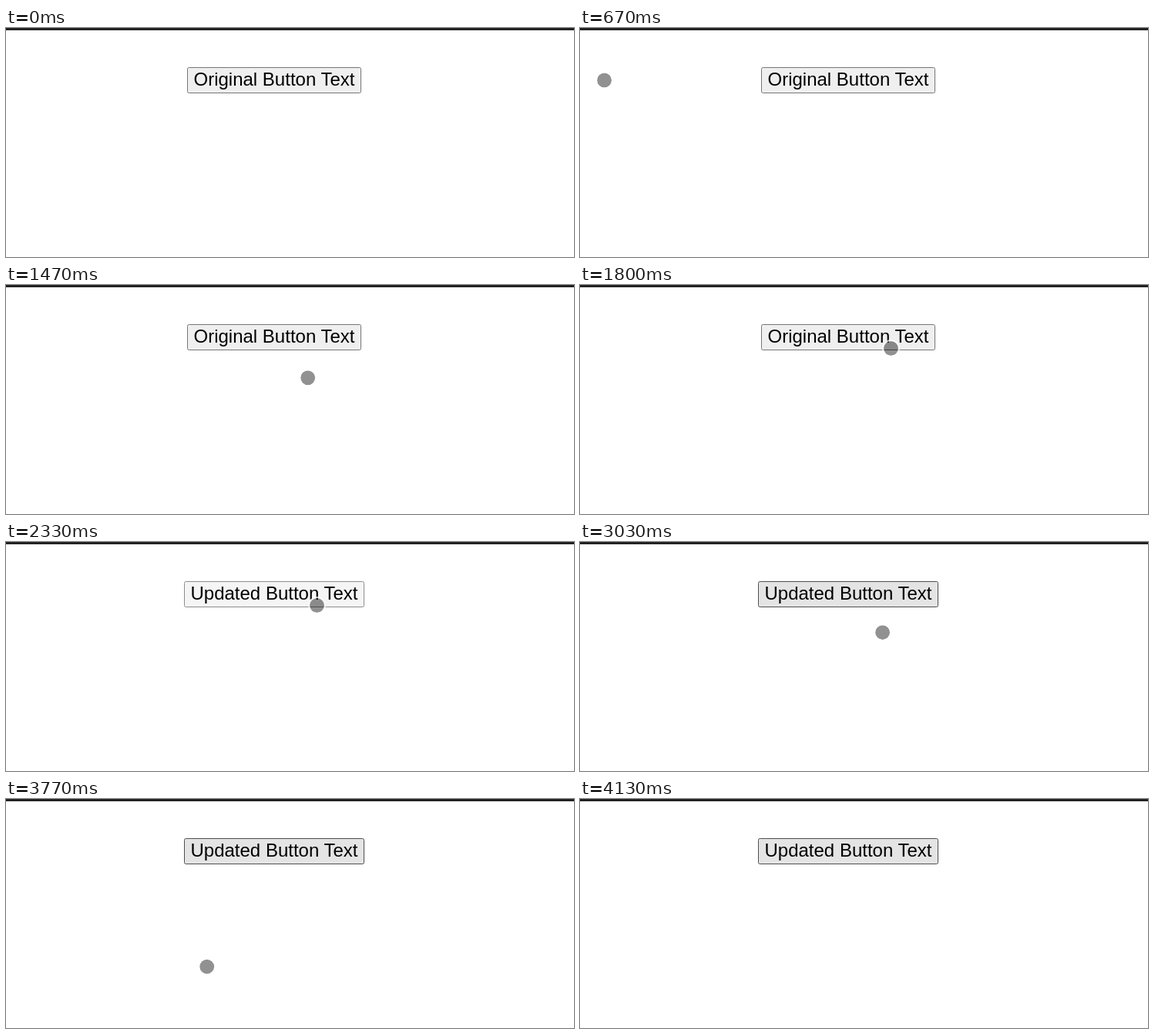
Recreate the animation shown at these times as an HTML page. Size 737 by 298 pixels, loop 6710 ms.

```html
<!DOCTYPE html>
<html lang="en">
<head>
<meta charset="utf-8">
<title>Button press</title>
<style>
  html, body { margin: 0; width: 100%; height: 100%; overflow: hidden; background: #fff; }
  svg { display: block; }
  text { font: 24px "Liberation Sans", Arial, sans-serif; text-anchor: middle; }
</style>
</head>
<body>
<svg width="737" height="298" viewBox="0 0 737 298">
  <rect width="737" height="3" fill="#232124"/>
  <rect id="button" y="51.5" height="33" rx="2"/>
  <text id="label" x="348" y="75"></text>
  <g id="pointer">
    <circle r="9.5" fill="#000" fill-opacity=".43"/>
    <circle r="10.5" fill="none" stroke="#fff" stroke-opacity=".7" stroke-width="2"/>
  </g>
</svg>
<script>
const LOOP = 6710;
const button = document.getElementById("button");
const label = document.getElementById("label");
const pointer = document.getElementById("pointer");

const buttonStates = [
  { from: 0, text: "Original Button Text", width: 225, fill: "#efefef", stroke: "#767676" },
  { from: 2330, text: "Updated Button Text", width: 233, fill: "#f5f5f5", stroke: "#8d8d8d" },
  { from: 2470, text: "Updated Button Text", width: 233, fill: "#e4e4e4", stroke: "#4f4f4f" }
];

// Entry path; velocities are in pixels per millisecond.
const entry = [
  { t: 500, p: [36, -3], v: [-0.07, 0.36] },
  { t: 670, p: [31.5, 67.5], v: [0.08, 0.47] },
  { t: 1070, p: [325, 203.5], v: [0.78, 0] },
  { t: 1130, p: [368.5, 195.5], v: [0.66, -0.22] }
];
const turn = [368.5, 195.5];
const press = [403.5, 82.5];
const rest = [333.5, 207.5];

const progress = (t, start, end) => Math.min(1, Math.max(0, (t - start) / (end - start)));
const easeOut = (s, power) => 1 - (1 - s) ** power;
const mix = (a, b, s) => a + (b - a) * s;

function hermite(a, b, t) {
  const d = b.t - a.t, s = (t - a.t) / d;
  return [0, 1].map(i =>
    mix(a.p[i], b.p[i], s * s * (3 - 2 * s)) +
    d * s * (1 - s) * (a.v[i] * (1 - s) - b.v[i] * s));
}

function glide(from, to, s, powerX, powerY) {
  return [mix(from[0], to[0], easeOut(s, powerX)), mix(from[1], to[1], easeOut(s, powerY))];
}

function pointerAt(t) {
  if (t < 500 || t >= 4130) return null;
  if (t < 1130) {
    const i = entry.findIndex(key => key.t > t);
    return hermite(entry[i - 1], entry[i], t);
  }
  if (t < 2935) return glide(turn, press, progress(t, 1165, 1800), 1.65, 1.65);
  if (t < 3635) return glide(press, rest, progress(t, 2935, 3630), 1.14, 2.22);
  const s = progress(t, 3635, 4130);
  return [mix(rest[0], -9.5, s ** 1.2), rest[1] + 57.9 * s - 69.9 * s * s];
}

function draw(now) {
  const t = now % LOOP;
  const state = buttonStates.filter(s => s.from <= t).pop();
  button.setAttribute("x", 348 - state.width / 2);
  button.setAttribute("width", state.width);
  button.setAttribute("fill", state.fill);
  button.setAttribute("stroke", state.stroke);
  label.textContent = state.text;

  const position = pointerAt(t);
  pointer.style.display = position ? "" : "none";
  if (position) pointer.setAttribute("transform", `translate(${position})`);
}

const start = performance.now();
function tick() {
  draw(performance.now() - start);
  requestAnimationFrame(tick);
}
tick();
</script>
</body>
</html>
```
